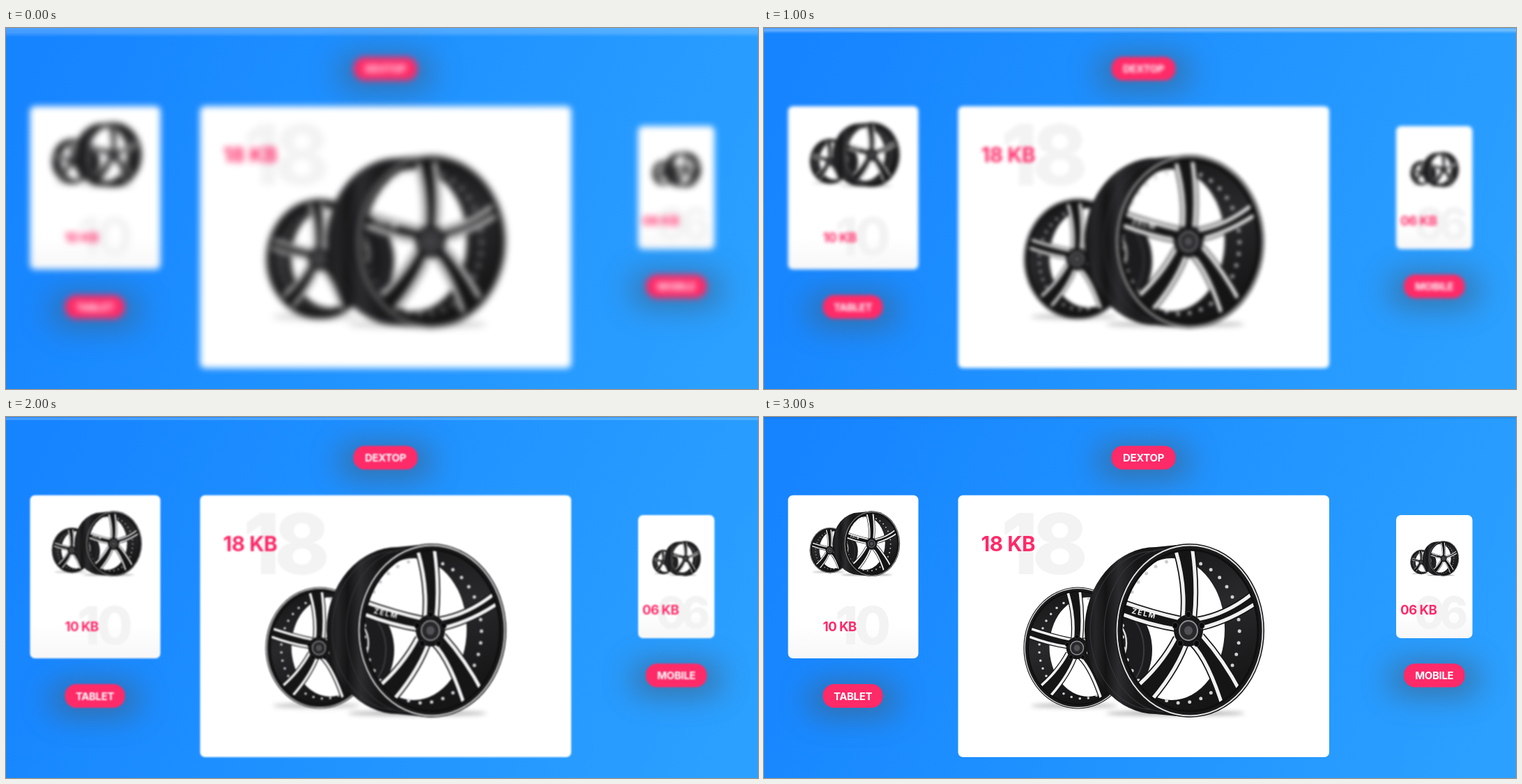
Write an HTML page that moves like this. It is 1079x519 px and loops after 4000 ms.

```html
<!DOCTYPE html>
<html lang="en">
<head>
<meta charset="utf-8">
<title>Responsive image sizes</title>
<style>
  html, body { margin: 0; width: 100%; height: 100%; overflow: hidden; }
  body { position: relative; background: linear-gradient(112deg, #1684ff 5%, #1f91ff 45%, #2ba0ff 95%); }
  svg { position: absolute; inset: 0; width: 100%; height: 100%; }
  #band { position: absolute; left: 0; top: 0; width: 100%; height: 14px; }
  text { font-family: Inter, "Open Sans", sans-serif; font-weight: 700; }
  .soft { filter: blur(22px); }
  .ground { filter: blur(3px); }
</style>
</head>
<body>
<div id="band"></div>
<svg id="scene" viewBox="0 0 1079 519">
  <defs>
    <linearGradient id="cardFill" x2="0" y2="1">
      <stop offset=".8" stop-color="#fff"/><stop offset="1" stop-color="#f7f7f8"/>
    </linearGradient>
    <linearGradient id="barrel">
      <stop offset="0" stop-color="#101011"/><stop offset=".1" stop-color="#262628"/>
      <stop offset=".2" stop-color="#141415"/><stop offset=".32" stop-color="#2c2c2f"/>
      <stop offset=".5" stop-color="#161617"/><stop offset="1" stop-color="#1b1b1d"/>
    </linearGradient>
    <linearGradient id="well" x2=".3" y2="1">
      <stop offset="0" stop-color="#151516"/><stop offset=".5" stop-color="#29292b"/>
      <stop offset="1" stop-color="#161617"/>
    </linearGradient>
    <clipPath id="opening"><ellipse cx="611" cy="307" rx="97" ry="115"/></clipPath>
    <g id="wheels"></g>
  </defs>
  <g id="cards"></g>
</svg>
<script>
const get = id => document.getElementById(id);

// Each spoke: one edge outwards, across the rim, the other edge back.
const spokes = [
  'M601 289Q606 240 589 186L614 186Q622 240 617 289',
  'M622 291Q664 284 703 252L711 264Q672 292 628 303',
  'M628 314Q660 350 684 396L660 422Q638 350 614 326',
  'M591 317Q570 358 530 392L548 416Q588 372 605 328',
  'M597 290Q555 281 503 262L503 279Q548 298 592 305'
];

const ellipse = (x, y, rx, ry, rest) =>
  `<ellipse cx="${x}" cy="${y}" rx="${rx}" ry="${ry}" ${rest}/>`;

function nuts() {
  let out = '';
  for (let i = 0; i < 5; i++) {
    const a = (i * 72 - 90) * Math.PI / 180;
    out += ellipse(609 + 20 * Math.cos(a), 307 + 23 * Math.sin(a), 4, 4.5,
      'fill="#09090a" stroke="#4a4a4e" stroke-width=".8"');
  }
  return out;
}

// shift moves the far end of the rim sideways, behind holds parts seen through it
function face(shift, behind = '') {
  const bars = spokes.map(d =>
    `<path d="${d}" fill="#151516" stroke="#151516" stroke-width="8.5"/>` +
    `<path d="${d}" fill="#151516" stroke="#f1f1f2" stroke-width="5"/>`).join('');
  return ellipse(611, 307, 107, 125, 'fill="#1a1a1b"') +
    ellipse(611, 307, 104.5, 122.5, 'fill="none" stroke="#e4e4e6" stroke-width="1.8"') +
    `<g clip-path="url(#opening)">` +
    ellipse(611, 307, 97, 115, 'fill="url(#well)"') +
    ellipse(609 - shift, 305, 76, 102, 'fill="#fff"') + behind +
    ellipse(609 - shift * .45, 308, 84, 103,
      'fill="none" stroke="#cfcfd3" stroke-width="5" stroke-linecap="round" stroke-dasharray="0 16.8"') +
    bars + '</g>' +
    ellipse(611, 307, 98, 116, 'fill="none" stroke="#0f0f10" stroke-width="3"') +
    ellipse(609, 307, 21, 23, 'fill="#161617"') + nuts() +
    ellipse(609, 307, 13, 14, 'fill="#29292b" stroke="#8d8d92" stroke-width="2"') +
    ellipse(609, 307, 6, 6.5, 'fill="#505055"');
}

const rearPart =
  ellipse(500, 335, 57, 70, 'fill="#1c1c1e"') +
  ellipse(495, 335, 50, 63, 'fill="none" stroke="#3b3b3f" stroke-width="2"') +
  ellipse(482, 325, 38, 40, 'fill="none" stroke="#ddd" stroke-width="2.5"');

get('wheels').innerHTML =
  ellipse(445, 415, 62, 3, 'fill="#666" opacity=".5" class="ground"') +
  ellipse(590, 426, 100, 3, 'fill="#555" opacity=".55" class="ground"') +
  `<g transform="translate(4.4 117.1) scale(.73 .7)">${face(-22)}</g>` +
  '<path d="M612 182L562 187A102 120 0 0 0 562 427L612 432Z" fill="url(#barrel)"/>' +
  '<path d="M562 193A92 114 0 0 0 558 421M580 190A88 116 0 0 0 574 424" fill="none" stroke="#343437" stroke-width="1.2"/>' +
  face(24, rearPart) +
  '<text transform="translate(527 282) rotate(13)" font-size="10.5" letter-spacing="1.8" fill="#f4f4f4">ZELM</text>';

const word = (s, x, y, size, gap, fill, rest = '') =>
  `<text x="${x}" y="${y}" font-size="${size}" letter-spacing="${gap}" fill="${fill}" ${rest}>${s}</text>`;

function card(x, y, w, h, fill, wheels, big, small) {
  return `<rect x="${x}" y="${y}" width="${w}" height="${h}" rx="7" fill="${fill}"/>` +
    word(...big, '#f3f3f4', 'style="font-weight:800"') +
    `<use href="#wheels" transform="${wheels}"/>` + word(...small, '#ff2a68');
}

function pill(label, x, y, w) {
  const box = `height="34" rx="16"`;
  return `<rect x="${x - 20}" y="${y - 1}" width="${w + 40}" height="46" rx="20" fill="#40627f" opacity=".72" class="soft"/>` +
    `<rect x="${x}" y="${y}" width="${w}" ${box} fill="#ff2a68"/>` +
    word(label, x + w / 2, y + 22.6, 14.9, -.3, '#fff', 'text-anchor="middle"');
}

get('cards').innerHTML =
  pill('DEXTOP', 498.5, 41.5, 92) +
  pill('TABLET', 84.5, 384, 86) +
  pill('MOBILE', 918, 354.5, 87.5) +
  card(34.5, 112.5, 187, 234.5, 'url(#cardFill)', 'translate(-74.1 67.1) scale(.375)',
    ['10', 102, 327, 75, -5], ['10 KB', 84.5, 307.5, 18.8, -.6]) +
  card(278.5, 112.5, 532.5, 376.5, '#fff', '',
    ['18', 340, 226, 121, -9], ['18 KB', 311.5, 192.5, 29.5, -.4]) +
  card(907, 141, 109.5, 177, 'url(#cardFill)', 'translate(852.1 141.4) scale(.202)',
    ['06', 933, 304, 63, -8], ['06 KB', 913, 283.7, 18.8, -.6]);

// Loading steps: blur radius and the strip along the top edge
const steps = [
  [4.8, '#ffffff3d 0, #ffffff30 7px, #fff0 13px'],
  [2.5, '#ffffff30 0, #ffffff5c 3px, #fff0 8px'],
  [1.1, '#ffffff08 0, #ffffff48 3px, #fff0 5px'],
  [0, '#1c4a9033 0, #1c4a9022 2px, #fff0 3.5px']
];
const table = [...steps, steps[3]];
const loop = { duration: 4000, iterations: Infinity };
const hold = (el, key, value) => el.animate(
  table.map((s, i) => ({ offset: i / 4, easing: 'steps(1, end)', [key]: value(s) })), loop);

const runs = [
  hold(get('scene'), 'filter', s => `blur(${s[0]}px)`),
  hold(get('band'), 'backgroundImage', s => `linear-gradient(${s[1]})`)
];
runs.forEach(r => { r.startTime = 0; });
</script>
</body>
</html>
```
